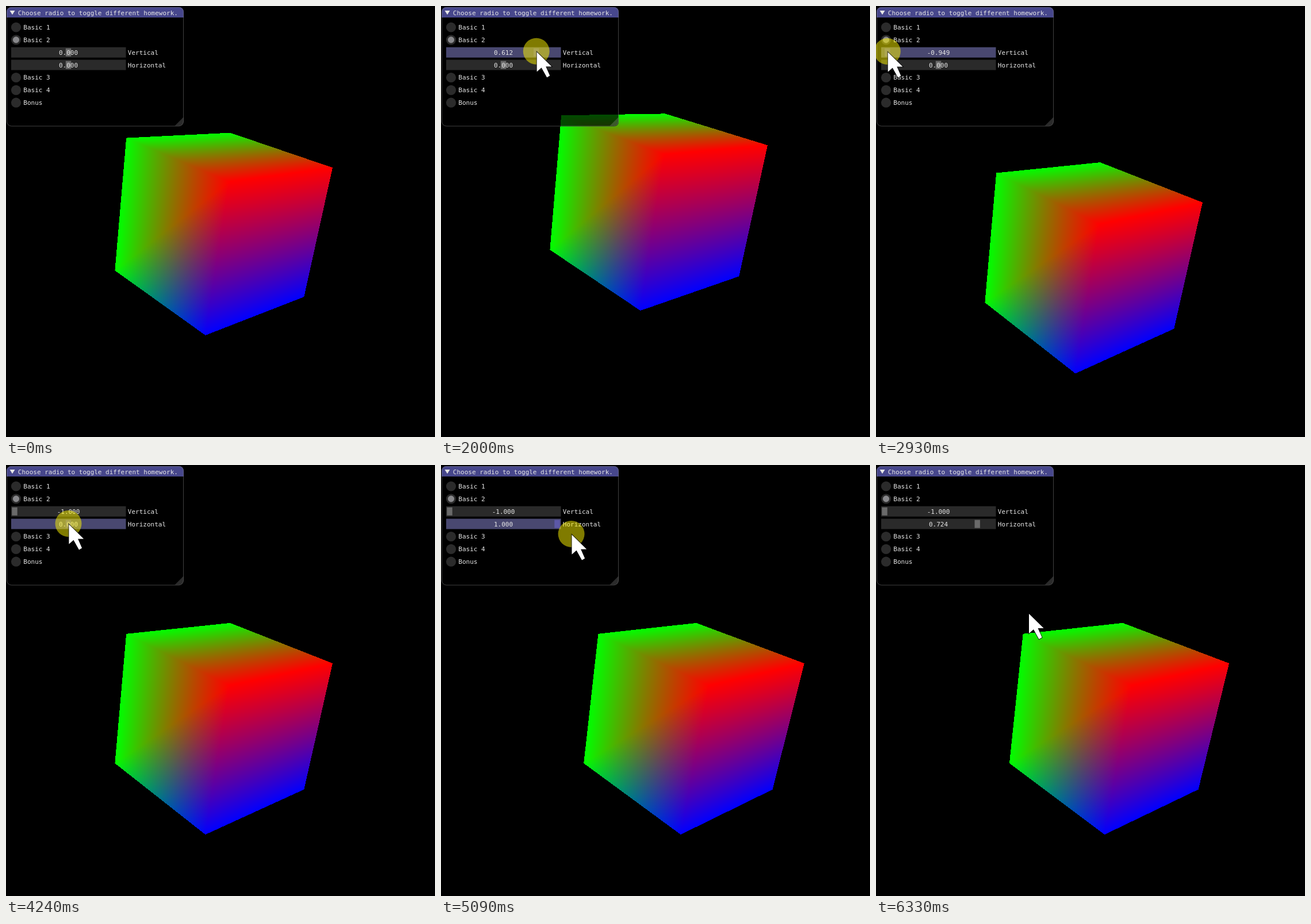
An HTML page with a canvas for the animation above (6400 ms loop, 746 by 750 pixels).

```html
<!DOCTYPE html>
<html>
<head>
<meta charset="utf-8">
<style>
html, body { margin: 0; height: 100%; overflow: hidden; background: #000; }
canvas { display: block; }
</style>
</head>
<body>
<canvas id="stage" width="746" height="750"></canvas>
<script>
const W = 746, H = 750, LOOP = 6400, TICK = 77.2;
const ctx = document.getElementById('stage').getContext('2d');

// Three neighbouring cube corners; the rest follow by symmetry about the centre
const GREEN = [0, 255, 0], RED = [255, 0, 0], BLUE = [0, 0, 255];
const corner = (pos, color) => ({ pos, color });
const mirror = (c, color) => corner(c.pos.map(k => -k), color);
const A = corner([-2.52, 2.255, .697], GREEN);
const B = corner([.346, 2.833, -1.88], GREEN);
const C = corner([3.088, 1.46, .597], RED);
const D = corner(A.pos.map((k, i) => k + C.pos[i] - B.pos[i]), RED);
const E = mirror(C, GREEN), F = mirror(B, BLUE), G = mirror(A, BLUE);
const TRIANGLES = [[A, B, D], [B, C, D], [A, D, E], [E, D, F], [D, C, F], [C, G, F]];
const FOCAL = 905, DISTANCE = 14.79, CENTER_X = 371, CENTER_Y = 374.4;

// Pointer moves: first tick, last tick, x, y, easing
const smooth = p => p * p * (3 - 2 * p);
const out = p => Math.sin(p * Math.PI / 2);
const ENTRY = [456, 556];
const MOVES = [
  [1, 3, 318, 240, smooth],
  [6, 12, 114, 74, smooth],
  [23, 30.5, 202, 82, out],
  [31.445, 38.91, 12, 79, smooth],
  [41, 45, 14, 88, smooth],
  [47, 52, 117, 102, smooth],
  [54, 55, 108.5, 102, smooth],
  [55, 59, 49, 104, smooth],
  [59.2, 66.2, 227, 120, smooth],
  [67, 75, 176.2, 137, smooth],
  [81, 82, 265, 257.5, smooth]
];
const ARROW = [[0, 0], [0, 34], [8, 27], [17.5, 44], [22.5, 41], [15.5, 25], [25.5, 25]];

const SLIDER_MID = 108.5, SLIDER_REACH = 93.5;

function pointerAt(n) {
  let [x, y] = ENTRY;
  for (const [from, to, toX, toY, ease] of MOVES) {
    const k = ease(Math.max(0, Math.min(1, (n - from) / (to - from))));
    x += (toX - x) * k;
    y += (toY - y) * k;
  }
  return [x, y];
}

function valueAt(n) {
  return Math.max(-1, Math.min(1, (pointerAt(n)[0] - SLIDER_MID) / SLIDER_REACH));
}

function project([x, y, z], h, v) {
  const scale = FOCAL / (DISTANCE - z);
  return [CENTER_X + (x + h) * scale, CENTER_Y - (y + v) * scale, scale];
}

// Perspective-correct colour fill
function fillTriangle(px, tri, h, v) {
  const [p, q, r] = tri.map(c => project(c.pos, h, v));
  const [cp, cq, cr] = tri.map(c => c.color);
  const xs = [p[0], q[0], r[0]], ys = [p[1], q[1], r[1]];
  const area = (q[0] - p[0]) * (r[1] - p[1]) - (r[0] - p[0]) * (q[1] - p[1]);
  const x1 = Math.min(W - 1, Math.max(...xs)), y1 = Math.min(H - 1, Math.max(...ys));
  for (let y = Math.max(0, Math.floor(Math.min(...ys))); y <= y1; y++) {
    for (let x = Math.max(0, Math.floor(Math.min(...xs))); x <= x1; x++) {
      const dx = x + .5 - p[0], dy = y + .5 - p[1];
      const b = (dx * (r[1] - p[1]) - dy * (r[0] - p[0])) / area;
      const c = (dy * (q[0] - p[0]) - dx * (q[1] - p[1])) / area;
      const a = 1 - b - c;
      if (a < -1e-9 || b < -1e-9 || c < -1e-9) continue;
      const ka = a * p[2], kb = b * q[2], kc = c * r[2], sum = ka + kb + kc;
      const o = (y * W + x) * 4;
      for (let i = 0; i < 3; i++) px[o + i] = (ka * cp[i] + kb * cq[i] + kc * cr[i]) / sum;
    }
  }
}

function drawCube(h, v) {
  const img = ctx.createImageData(W, H), px = img.data;
  for (let i = 3; i < px.length; i += 4) px[i] = 255;
  for (const tri of TRIANGLES) fillTriangle(px, tri, h, v);
  ctx.putImageData(img, 0, 0);
}

function shape(points, fill) {
  ctx.beginPath();
  points.forEach(([x, y]) => ctx.lineTo(x, y));
  ctx.closePath();
  ctx.fillStyle = fill;
  ctx.fill();
}

function box(x, y, w, h, r, fill) {
  ctx.beginPath();
  ctx.roundRect(x, y, w, h, r);
  ctx.fillStyle = fill;
  ctx.fill();
}

function disc(x, y, r, fill) {
  ctx.beginPath();
  ctx.arc(x, y, r, 0, 7);
  ctx.fillStyle = fill;
  ctx.fill();
}

function text(str, x, y, align = 'left') {
  ctx.textAlign = align;
  ctx.fillStyle = '#e6e6e6';
  ctx.fillText(str, x, y);
}

function radio(label, y, on) {
  disc(17.5, y, 8.6, 'rgba(110,110,110,.39)');
  if (on) disc(17.5, y, 5.6, 'rgba(230,230,235,.5)');
  text(label, 30.3, y + 4);
}

function slider(label, y, value, active) {
  box(9, y - 9, 199.5, 18, 0, active ? 'rgba(107,105,163,.69)' : 'rgba(110,110,110,.39)');
  box(SLIDER_MID + SLIDER_REACH * value - 4.7, y - 7, 9.4, 14, 0,
    active ? 'rgba(105,99,204,.6)' : 'rgba(255,255,255,.3)');
  text(value.toFixed(3), SLIDER_MID, y + 4, 'center');
  text(label, 211.8, y + 4);
}

function drawPanel(v, h, dragV, dragH) {
  ctx.font = '11px "DejaVu Sans Mono", monospace';
  box(1, 2, 308, 207.5, 8, 'rgba(0,0,0,.7)');
  box(1, 2, 308, 18, [8, 8, 0, 0], 'rgba(82,82,161,.87)');
  shape([[6.5, 8], [15.5, 8], [11, 15.2]], '#e6e6e6');
  text('Choose radio to toggle different homework.', 20.8, 15.5);
  const rowY = i => 37 + 21.87 * i;
  radio('Basic 1', rowY(0));
  radio('Basic 2', rowY(1), true);
  slider('Vertical', rowY(2), v, dragV);
  slider('Horizontal', rowY(3), h, dragH);
  ['Basic 3', 'Basic 4', 'Bonus'].forEach((label, i) => radio(label, rowY(4 + i)));
  shape([[293.5, 208.5], [308.5, 193.5], [308.5, 202], [306.5, 206.5], [302, 208.5]],
    'rgba(255,255,255,.17)');
  ctx.beginPath();
  ctx.roundRect(1.5, 2.5, 307, 206.5, 8);
  ctx.lineWidth = 1;
  ctx.strokeStyle = 'rgba(128,128,128,.5)';
  ctx.stroke();
}

function drawPointer(x, y, pressed) {
  if (pressed) disc(x, y, 23, 'rgba(255,245,0,.5)');
  shape(ARROW.map(([dx, dy]) => [x + 1 + dx, y + 1.5 + dy]), '#fff');
  ctx.lineWidth = 2;
  ctx.strokeStyle = 'rgba(0,0,0,.7)';
  ctx.stroke();
  ctx.fill();
}

function draw(t) {
  const n = Math.floor((t + 8) / TICK);
  const dragV = t >= 1640 && n < 42, dragH = n >= 52 && n < 76;
  const v = t < 1640 ? 0 : valueAt(Math.min(n, 39));
  const h = n < 52 ? 0 : valueAt(Math.min(n, 75));
  drawCube(h, v);
  drawPanel(v, h, dragV, dragH);
  if (n > 0) drawPointer(...pointerAt(n), dragV || dragH);
}

const start = performance.now();
function loop() {
  draw((performance.now() - start) % LOOP);
  requestAnimationFrame(loop);
}
loop();
</script>
</body>
</html>
```
